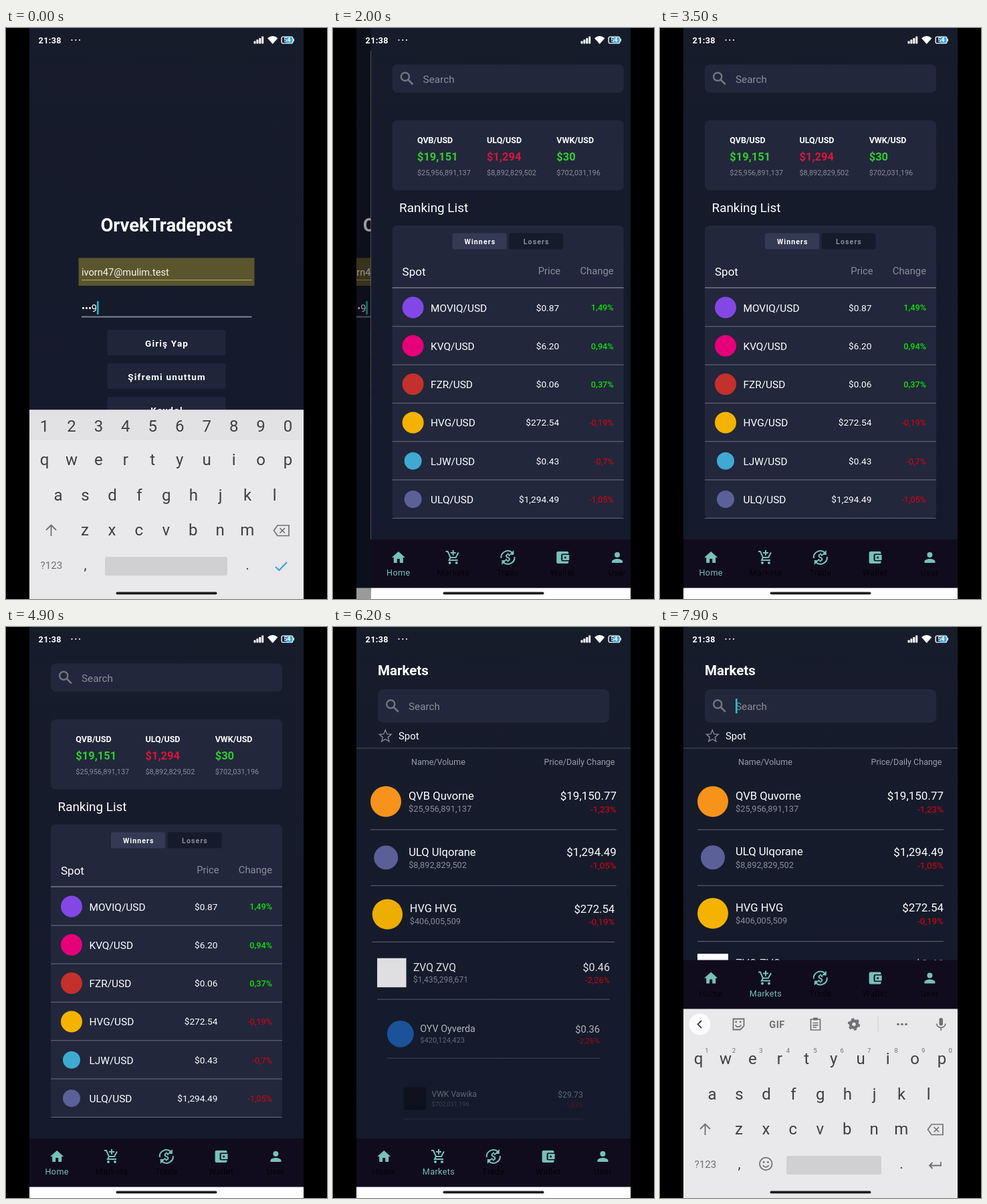
Recreate the animation shown at these times as an HTML page. Size 480 px wide and 853 px high, loop 8 s.

```html
<!DOCTYPE html>
<html lang="tr">
<head>
<meta charset="utf-8">
<title>Exchange app</title>
<style>
  html, body { margin: 0; width: 100%; height: 100%; overflow: hidden; background: #000; }
  svg { display: block; width: 100vw; height: 100vh; font-family: Roboto, Arial, sans-serif; }
</style>
</head>
<body>
<svg id="stage" viewBox="0 0 480 853"></svg>
<script>
const LOOP = 8000, STEP = 100;
const CARD = '#22273b', GREY = '#8a8d99', TEAL = '#76c1bb', CURSOR = '#1ec6c0';
const GREEN = '#0be00b', RED = '#e0000f', KEY = '#3f4043', SOFT = '#707174';

// drawing helpers
const text = (x, y, str, size, fill = '#fff', extra = '') =>
  `<text x="${x}" y="${y}" font-size="${size}" fill="${fill}" ${extra}>${str}</text>`;
const rect = (x, y, w, h, fill, r = 0, extra = '') =>
  `<rect x="${x}" y="${y}" width="${w}" height="${h}" rx="${r}" fill="${fill}" ${extra}/>`;
const disc = (x, y, r, fill, extra = '') => `<circle cx="${x}" cy="${y}" r="${r}" fill="${fill}" ${extra}/>`;
const line = (x1, x2, y, stroke, w = 1) => `<path d="M${x1} ${y}H${x2}" stroke="${stroke}" stroke-width="${w}"/>`;
const stroke = (d, color, w = 2) => `<path d="${d}" fill="none" stroke="${color}" stroke-width="${w}"/>`;
const fill = (d, color) => `<path d="${d}" fill="${color}"/>`;
const icon = (x, y, body, scale = 1) =>
  `<g transform="translate(${x} ${y}) scale(${scale}) translate(-12 -12)">${body}</g>`;
const group = (id, body, extra = '') => `<g id="${id}" ${extra}>${body}</g>`;
const MID = 'text-anchor="middle"', END = 'text-anchor="end"', BOLD = 'font-weight="700"';

const searchIcon = y => icon(89, y,
  `<circle cx="9.5" cy="9.5" r="5.5" fill="none" stroke="#74767f" stroke-width="2.2"/>` +
  stroke('M13.8 13.8L20 20', '#74767f', 2.4), 1.1);

function login() {
  const button = (y, label) => rect(151.5, y, 177, 38, '#20253a', 3) +
    text(240.6, y + 24.5, label, 13.5, '#fff', `${MID} ${BOLD} letter-spacing="1.2"`);
  return rect(35, 0, 410, 853, 'url(#bg)') +
    text(240, 304, 'OrvekTradepost', 27.4, '#fff', `${MID} ${BOLD}`) +
    rect(108.5, 343.5, 263, 41.5, '#5b552e') +
    text(113, 370, 'ivorn47@mulim.test', 14.6, '#f7f5ea') +
    line(113, 368, 376.5, '#b5a968') +
    text(113, 424, '', 14.7, '#fff', 'id="password"') +
    rect(0, 408, 2.4, 20, CURSOR, 0, 'id="passwordCursor"') +
    line(113, 367.5, 431.5, '#81848e', 1.8) +
    button(451, 'Giriş Yap') + button(501, 'Şifremi unuttum') + button(551, 'Kaydol') +
    rect(35, 836.5, 410, 17, '#fff');
}

function home() {
  const stats = [
    ['QVB', '$19,151', '$25,956,891,137', '#32cd32'],
    ['ULQ', '$1,294', '$8,892,829,502', '#dc143c'],
    ['VWK', '$30', '$702,031,196', '#32cd32']
  ];
  const ranks = [
    ['MOVIQ', '$0.87', '1,49%', '#8247e5'],
    ['KVQ', '$6.20', '0,94%', '#e6007a'],
    ['FZR', '$0.06', '0,37%', '#c4302b'],
    ['HVG', '$272.54', '-0,19%', '#f5b300'],
    ['LJW', '$0.43', '-0,7%', '#3fa9d2'],
    ['ULQ', '$1,294.49', '-1,05%', '#5c6098']
  ];
  const stat = ([name, price, volume, color], i) => {
    const x = 104.3 + 104.2 * i;
    return text(x, 171.5, name + '/USD', 12.5, '#fff', BOLD) +
      text(x, 198, price, 16.5, color, BOLD) + text(x, 219.5, volume, 10.9, GREY);
  };
  const rank = ([name, price, change, color], i) => {
    const y = 417.5 + 57.3 * i, down = change[0] === '-';
    return disc(98, y, i > 3 ? 13 : 16, color) + text(124.5, y + 6, name + '/USD', 15.4) +
      text(316.5, y + 5, price, 13.7, '#fff', END) +
      text(398, y + 4.8, change, 12.7, down ? RED : GREEN, `${END} font-weight="${down ? 400 : 500}"`) +
      line(67, 413, y + 28.3, '#6c6f7c');
  };
  const tab = 'letter-spacing="1.1" ' + MID + ' ' + BOLD;
  return rect(35, 34, 410, 730, 'url(#bg)') +
    rect(67, 54.5, 346, 42, CARD, 7) + searchIcon(75.5) + text(113, 81.5, 'Search', 15.3, GREY) +
    rect(67, 138, 346, 104.5, CARD, 7) + stats.map(stat).join('') +
    text(77.5, 275, 'Ranking List', 18.9) +
    rect(67, 295, 346, 437.5, CARD, 7) +
    rect(157, 306.5, 81, 24, '#343a54', 3) + text(198.3, 322.7, 'Winners', 10.6, '#fff', tab) +
    rect(241.5, 306.5, 81, 24, '#161b2b', 3) + text(282.5, 322.7, 'Losers', 10.6, GREY, tab) +
    text(82, 370, 'Spot', 17) + text(318.5, 368, 'Price', 14.7, GREY, END) +
    text(398, 368, 'Change', 14.8, GREY, END) +
    line(67, 413, 388, '#a0a2aa') + ranks.map(rank).join('');
}

const coins = [
  ['QVB Quvorne', '$25,956,891,137', '$19,150.77', '-1,23%', '#f7931a'],
  ['ULQ Ulqorane', '$8,892,829,502', '$1,294.49', '-1,05%', '#5c6098'],
  ['HVG HVG', '$406,005,509', '$272.54', '-0,19%', '#f5b300'],
  ['ZVQ ZVQ', '$1,435,298,671', '$0.46', '-2,26%', '#fff', true],
  ['OYV Oyverda', '$420,124,423', '$0.36', '-2,26%', '#1f6fd0'],
  ['VWK Vawika', '$702,031,196', '$29.73', '-1,83%', '#000', true],
  ['PLIM Plimdrox', '', '$0.06', '', '#c9a633']
];
const rowY = i => 260.8 + 83.45 * i;

function markets() {
  const star = Array.from({ length: 10 }, (_, i) => {
    const a = Math.PI * (i / 5 - 0.5), r = i % 2 ? 4.2 : 9.4;
    return `${(78.3 + r * Math.cos(a)).toFixed(1)},${(163.3 + r * Math.sin(a)).toFixed(1)}`;
  }).join(' ');
  const row = ([name, volume, price, change, color, square], i) => {
    const y = rowY(i);
    return group('row' + i,
      (square ? rect(56, y - 23, 46, 46, color) : disc(79, y, i === 1 ? 18 : 23, color)) +
      text(113, y - 2.8, name, 16.6) + text(113, y + 15.3, volume, 12.85, GREY) +
      text(424, y - 2.6, price, 17, '#fff', END) + text(424, y + 16.5, change, 13.5, RED, END) +
      line(56, 424, y + 42, '#666977'));
  };
  return rect(35, 34, 410, 730, 'url(#bg)') +
    text(67, 72, 'Markets', 20.5, '#fff', BOLD) +
    rect(67, 93, 346, 50, CARD, 8) + searchIcon(118) + text(113, 124, 'Search', 15.3, GREY) +
    rect(113, 107, 2.6, 22, CURSOR, 0, 'id="searchCursor"') +
    `<polygon points="${star}" fill="none" stroke="#858792" stroke-width="1.4"/>` +
    text(98, 167.5, 'Spot', 14.9) + line(35, 445, 181, '#4c505e') +
    text(117, 205.5, 'Name/Volume', 12.5, '#9a9ca6') +
    text(421.5, 205.5, 'Price/Daily Change', 12.5, '#9a9ca6', END) +
    coins.map(row).join('');
}

function tabs() {
  const bar = '#110c1d';
  const icons = [
    fill('M10 20v-6h4v6h5v-8h3L12 3 2 12h3v8z', TEAL),
    stroke('M1 3H4L8 12H16L20 4.5M8 12L6 16H19M12 1V9M8 5H16', TEAL) + disc(7, 20, 2, TEAL) + disc(17, 20, 2, TEAL),
    stroke('M2 13A10 10 0 0 1 19 5M22 11A10 10 0 0 1 5 19', TEAL) +
      fill('M21 1V8H14ZM3 23V16H10Z', TEAL) + text(12, 17.3, '$', 15, TEAL, `${MID} ${BOLD}`),
    rect(3, 3, 18, 18, TEAL, 2) + rect(10, 6.5, 13, 11, bar, 2) + rect(12, 8, 10, 8, TEAL) + disc(16, 12, 1.5, bar),
    disc(12, 8, 4, TEAL) + fill('M4 20V18C4 15.3 9.3 14 12 14S20 15.3 20 18V20Z', TEAL)
  ];
  return rect(35, 764, 410, 76, bar) +
    disc(158, 798, 47, '#000', 'id="ripple" opacity="0" clip-path="url(#bar)"') +
    ['Home', 'Markets', 'Trade', 'Wallet', 'User'].map((label, i) => {
      const x = 76.2 + 81.8 * i;
      return icon(x, 791, icons[i]) +
        text(x, 818, label, 12.6, '#050308', `${MID} letter-spacing=".4" id="tab${i}"`);
    }).join('');
}

function keyboard(search) {
  const keys = (str, x, y) => [...str].map((c, i) => text(x + 40.45 * i, y, c, 24, KEY, MID)).join('');
  const shared = keys('qwertyuiop', 57.5, 653) + keys('asdfghjkl', 78, 705.5) + keys('zxcvbnm', 118, 758) +
    stroke('M67.5 759V743M60 750L67.5 742.5L75 750', SOFT, 1.8) +
    stroke('M406 743H423V758.5H406L400.5 750.7ZM409.5 747L417 754.5M417 747L409.5 754.5', SOFT, 1.7) +
    text(68, 808, '?123', 15.2, SOFT, MID) + text(118.5, 809, ',', 21, KEY, MID) + text(361, 809, '.', 21, KEY, MID);
  const base = rect(35, 570.5, 410, 283, '#e9e8eb');
  if (!search) {
    return base + rect(35, 570.5, 410, 45.5, '#e2e1e4') + keys('1234567890', 57.5, 603) + shared +
      rect(148, 790, 183, 28, '#d0cfd2', 3) + stroke('M403 805L408.5 810L420 798', '#3a9fd8', 2);
  }
  const hints = [...'1234567890'].map((c, i) => text(70 + 40.45 * i, 636, c, 9.5, SOFT, MID)).join('');
  const gear = disc(290, 593.5, 5, 'none', `stroke="${SOFT}" stroke-width="4.5"`) +
    disc(290, 593.5, 8, 'none', `stroke="${SOFT}" stroke-width="2.4" stroke-dasharray="4.2 4.18"`);
  const smile = (x, y) => disc(x - 3.2, y - 2.5, 1.4, SOFT) + disc(x + 3.2, y - 2.5, 1.4, SOFT) +
    stroke(`M${x - 4.5} ${y + 2}Q${x} ${y + 8} ${x + 4.5} ${y + 2}`, SOFT, 1.7);
  return base + shared + hints +
    disc(59.5, 593.5, 16, '#fbfbfc') + stroke('M62 588L56.5 593.5L62 599', KEY, 1.8) +
    stroke('M109.5 585.5H125.5V596L120 601.5H109.5Z', SOFT, 1.8) + smile(117, 592.5) +
    text(175, 598.5, 'GIF', 14.5, SOFT, `${MID} ${BOLD} letter-spacing=".4"`) +
    stroke('M225.5 586H239.5V602H225.5ZM228.5 591.5H236.5M228.5 594.8H236.5M228.5 598H234', SOFT, 1.7) +
    rect(229, 583.5, 7, 4, SOFT, 1) + gear +
    stroke('M326 582V605', '#cfced2', 1) + [356, 362, 368].map(x => disc(x, 593.5, 1.8, SOFT)).join('') +
    rect(417.5, 584, 5.5, 11.5, SOFT, 2.7) + stroke('M413.5 592.5A6.8 6.8 0 0 0 427 592.5M420.2 599V603', SOFT, 1.7) +
    disc(158.3, 802, 9.3, 'none', `stroke="${SOFT}" stroke-width="1.8"`) + smile(158.3, 802) +
    rect(189, 790, 142, 28, '#d0cfd2', 3) +
    stroke('M420 799V804.5H403M407.5 800L403 804.5L407.5 809', SOFT, 1.8);
}

function status() {
  return text(48.5, 22.6, '21:38', 12.6, '#fff', BOLD + ' letter-spacing=".4"') +
    [98.5, 104.3, 110].map(x => disc(x, 18, 1.1, '#fff')).join('') +
    [0, 1, 2, 3].map(i => rect(370.5 + 3.9 * i, 19.5 - 2.3 * i, 3, 4 + 2.3 * i, '#fff', 0.8)).join('') +
    fill('M391 15.2Q398.7 9 406.4 15.2L398.7 24Z', '#fff') +
    rect(412, 13, 17, 10, '#3aa8e0', 2.5, 'stroke="#fff" stroke-width="1.2"') + rect(413, 14, 6, 8, '#20263a') +
    rect(429.8, 16, 1.2, 4, '#fff') + text(420.4, 21.2, '54', 8.6, '#fff', `${MID} ${BOLD}`);
}

document.getElementById('stage').innerHTML = `
  <defs>
    <linearGradient id="bg" gradientUnits="userSpaceOnUse" x1="0" y1="0" x2="0" y2="853">
      <stop stop-color="#171c2b"/><stop offset="1" stop-color="#141a2c"/>
    </linearGradient>
    <clipPath id="app">${rect(35, 0, 410, 853, '#000')}</clipPath>
    <clipPath id="bar">${rect(35, 764, 410, 72, '#000')}</clipPath>
  </defs>
  <g clip-path="url(#app)">` +
  group('login', login()) +
  rect(35, 0, 410, 853, '#000', 0, 'id="dim"') +
  group('main',
    rect(35, 0, 410, 853, 'url(#bg)') + rect(35, 34, 410, 730, '#fff') +
    group('home', home()) + group('markets', markets()) +
    group('tabs', tabs()) + rect(35, 836.5, 410, 17, '#fff')) +
  group('loginKeys', keyboard(false)) + group('searchKeys', keyboard(true)) +
  status() + rect(164.5, 842.6, 151, 3.6, '#1c1c1e', 1.8) + '</g>';

const $ = id => document.getElementById(id);
const set = (id, name, value) => $(id).setAttribute(name, value);
const move = (id, x, y) => set(id, 'transform', `translate(${x} ${y})`);
const show = (id, on) => set(id, 'visibility', on ? 'visible' : 'hidden');
const ramp = (t, start, length) => Math.min(1, Math.max(0, (t - start) / length));
const easeOut = u => 1 - (1 - u) ** 3;

function render(t) {
  // password typing
  const dots = 3 + (t >= 500) + (t >= 1100);
  $('password').textContent = '•'.repeat(dots) + '9';
  set('passwordCursor', 'x', 121.3 + 4.95 * dots);

  // main screen slides over the login screen
  const slide = easeOut(ramp(t, 1750, 400));
  move('login', -102 * slide, 0);
  set('dim', 'opacity', 0.42 * slide);
  move('main', 410 * (1 - slide), 0);
  move('loginKeys', 0, 283 * easeOut(ramp(t, 1750, 200)));

  // cross-fade to the markets tab
  const fade = ramp(t, 5700, 333);
  set('home', 'opacity', 1 - fade);
  set('markets', 'opacity', fade);
  set('tab0', 'fill', fade ? '#050308' : TEAL);
  set('tab1', 'fill', fade ? TEAL : '#050308');
  set('ripple', 'r', 47 * easeOut(ramp(t, 5650, 250)));
  set('ripple', 'opacity', 0.28 * (1 - ramp(t, 5900, 300)));
  coins.forEach((_, i) => {
    const e = easeOut(ramp(t, 5860 + 60 * i, 330)), y = rowY(i), s = 0.6 + 0.4 * e;
    set('row' + i, 'transform', `translate(240 ${y + 39 * (1 - e)}) scale(${s}) translate(-240 ${-y})`);
    set('row' + i, 'opacity', e);
  });

  // search focus and keyboard
  show('searchCursor', t >= 6800 && Math.floor((t - 6800) / 500) % 2 === 0);
  move('searchKeys', 0, 283 * (1 - easeOut(ramp(t, 6980, 320))));
  move('tabs', 0, t >= 7200 ? -266.5 : 0);
}

function tick(now) {
  render(Math.floor((now % LOOP) / STEP) * STEP);
  requestAnimationFrame(tick);
}
render(0);
requestAnimationFrame(tick);
</script>
</body>
</html>
```
